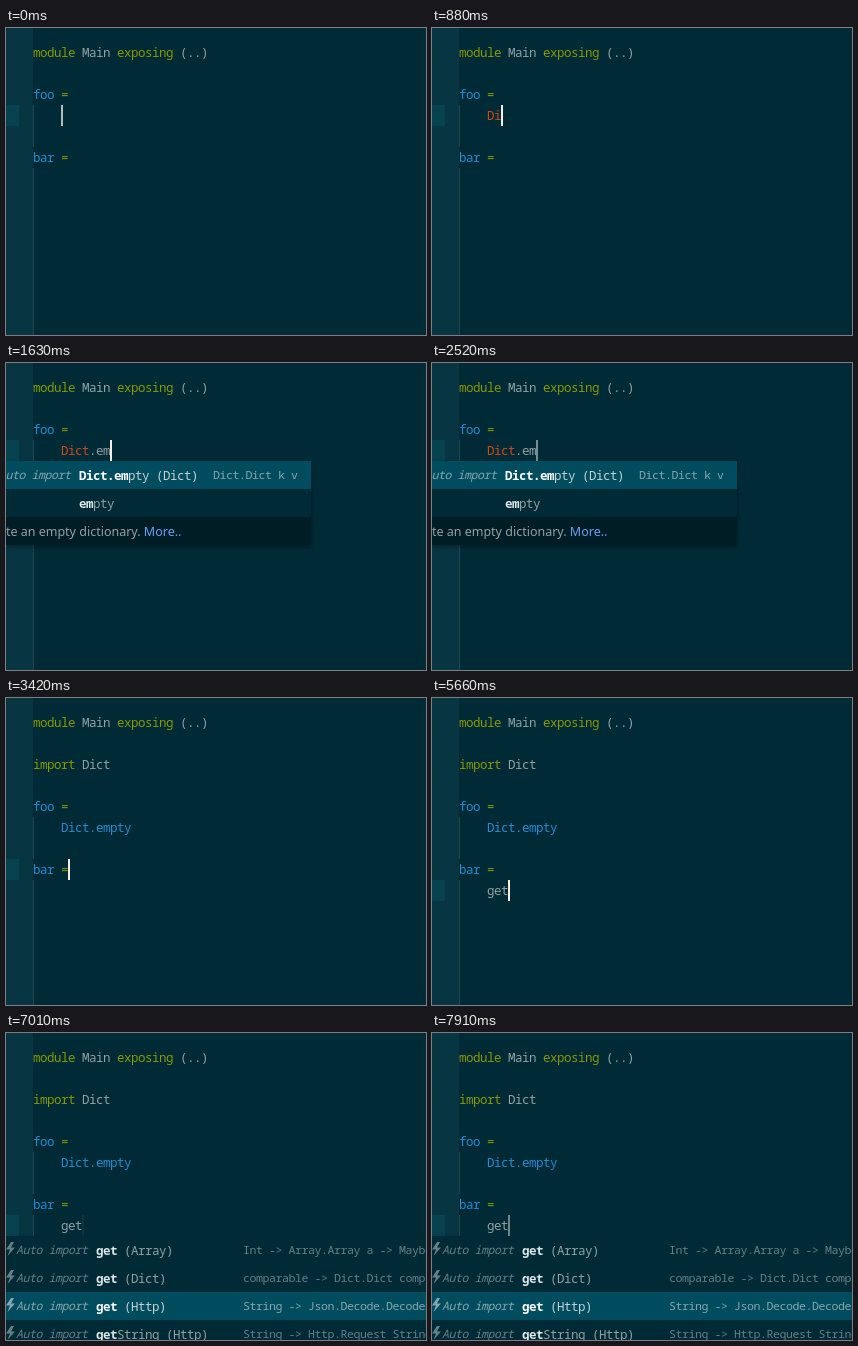
An HTML page that plays this animation: 420 by 307 pixels, repeating every 8000 ms.

```html
<!DOCTYPE html>
<html lang="en">
<head>
<meta charset="utf-8">
<title>Auto import completion</title>
<style>
  html, body { margin: 0; width: 100%; height: 100%; overflow: hidden; background: #002b36; }
  svg { display: block; width: 100%; height: 100%; }
  text { white-space: pre; font: 12.5px "Noto Sans Mono", monospace; letter-spacing: -.5px; fill: #93a1a1; }
  .key { fill: #859900; }
  .name { fill: #268bd2; }
  .type { fill: #cb4b16; }
  .hit { font-weight: 700; fill: #dce6e6; }
  .small { font-size: 11.6px; letter-spacing: -.46px; fill: #667f86; }
  .hint { font-style: italic; }
  .on { fill: #c3d2d4; }
  .on.small { fill: #86a5ac; }
  .on .hit { fill: #fff; }
  .doc { font: 12.5px "Noto Sans", sans-serif; letter-spacing: 0; }
  .link { fill: #6c9ef8; }
  .menu { filter: drop-shadow(0 2px 2px rgba(0, 0, 0, .35)); }
</style>
</head>
<body>
<svg viewBox="0 0 420 307" preserveAspectRatio="none">
  <g id="code"></g>
  <rect id="caret" width="2" height="21" fill="#f4f0e4"/>
  <g id="popup" class="menu"></g>
</svg>
<script>
const LOOP = 8000, LEFT = 27, CHAR = 7, LINE = 21, TOP = 14, ROW = 28;
const $ = id => document.getElementById(id);

const menus = {
  dict: {
    x: 74, y: 98, width: 440, detail: 237, hit: 5,
    items: [
      ['Dict.Dict (Dict)', 'Dict'],
      ['Dict.diff (Dict)', 'Dict.Dict comparable v -> Dict.Dict'],
      ['Dict.empty (Dict)', 'Dict.Dict k v'],
      ['Dict.filter (Dict)', '(comparable -> v -> Bool) -> Dict.Dict'],
      ['Dict.foldl (Dict)', '(comparable -> v -> b -> b) -> b'],
      ['Dict.foldr (Dict)', '(comparable -> v -> b -> b) -> b'],
      ['Dict.fromList (Dict)', 'List ( comparable, v ) -> Dict.Dict'],
      ['Dict.get (Dict)', 'comparable -> Dict.Dict comparable v']
    ]
  },
  empty: {
    x: 73, y: 98, width: 305, detail: 207, hit: 7,
    items: [['Dict.empty (Dict)', 'Dict.Dict k v'], ['empty', '', 2]],
    doc: 'Create an empty dictionary. '
  },
  get: {
    x: 90, y: 203, width: 440, detail: 237, hit: 3,
    items: [
      ['get (Array)', 'Int -> Array.Array a -> Maybe a'],
      ['get (Dict)', 'comparable -> Dict.Dict comparable v'],
      ['get (Http)', 'String -> Json.Decode.Decoder a'],
      ['getString (Http)', 'String -> Http.Request String']
    ]
  }
};

// Each step changes only the fields it names.
const steps = [
  { at: 0, foo: '', bar: null, imported: false, known: false, row: 3, col: 4, menu: null, pick: 0, blink: -200, solid: 0 },
  { at: 600, foo: 'D', col: 5, blink: null },
  { at: 750, foo: 'Di', col: 6 },
  { at: 890, foo: 'Dic', col: 7 },
  { at: 1030, foo: 'Dict', col: 8 },
  { at: 1180, foo: 'Dict.', col: 9 },
  { at: 1330, menu: 'dict' },
  { at: 1480, foo: 'Dict.e', col: 10 },
  { at: 1630, foo: 'Dict.em', col: 11, menu: 'empty', blink: 1785 },
  { at: 2670, foo: 'Dict.empty', col: 14, menu: null, blink: null },
  { at: 2820, imported: true, row: 5 },
  { at: 3120, known: true },
  { at: 3270, row: 7, col: 5 },
  { at: 3870, bar: '', row: 8, col: 0 },
  { at: 4160, col: 4, blink: 4545 },
  { at: 5360, bar: 'g', col: 5, blink: null },
  { at: 5510, bar: 'ge', col: 6 },
  { at: 5660, bar: 'get', col: 7 },
  { at: 5810, menu: 'get', blink: 5650, solid: 6050 },
  { at: 6860, pick: 1 },
  { at: 7010, pick: 2 }
];
steps.forEach((s, i) => { steps[i] = { ...steps[i - 1], ...s }; });

const escape = s => s.replace(/&/g, '&amp;').replace(/</g, '&lt;').replace(/>/g, '&gt;');
const span = (s, cls = '') => `<tspan class="${cls}">${escape(s)}</tspan>`;
const text = (x, y, body, cls = '') => `<text x="${x}" y="${y}" class="${cls}">${body}</text>`;
const rect = (x, y, w, h, fill) => `<rect x="${x}" y="${y}" width="${w}" height="${h}" fill="${fill}"/>`;
const lineTop = row => TOP + row * LINE;

function fooBody(s) {
  if (s.known) return span(s.foo, 'name');
  const [head, tail] = s.foo.split('.');
  const dot = tail === undefined ? '' : span('.', tail ? '' : 'key');
  return span(head, 'type') + dot + span(tail || '');
}

function drawCode(s) {
  const foo = s.imported ? 4 : 2, bar = foo + 3;
  const write = (row, body, col = 0) => text(LEFT + col * CHAR, lineTop(row) + 14.5, body);
  const guide = (from, to) => rect(LEFT, from, 1, to - from, '#1d4751');
  return rect(0, 0, LEFT, 307, '#073642') +
    rect(0, lineTop(s.row), 13, LINE, '#06424f') +
    guide(lineTop(foo + 1), lineTop(bar)) + guide(lineTop(bar + 1), 307) +
    write(0, span('module ', 'key') + span('Main ') + span('exposing ', 'key') + span('(..)')) +
    (s.imported ? write(2, span('import ', 'key') + span('Dict')) : '') +
    write(foo, span('foo ', 'name') + span('=', 'key')) +
    write(foo + 1, fooBody(s), 4) +
    write(bar, span('bar ', 'name') + span('=', 'key')) +
    (s.bar ? write(bar + 1, span(s.bar), 4) : '');
}

function drawItem(m, [label, detail, hit = m.hit], i, pick) {
  const y = m.y + i * ROW, base = y + 18.5, on = i === pick ? ' on' : '';
  const bolt = `<path transform="translate(${m.x - 90} ${y + 6})" d="M5 0L0 7.5H4L1.5 14L9 5.5H5L8 0Z" fill="${on ? '#86a5ac' : '#667f86'}"/>`;
  return (on ? rect(0, y, m.width, ROW, '#004c5f') : '') +
    (detail ? bolt + text(m.x - 80, base - .5, 'Auto import', 'small hint' + on) : '') +
    text(m.x, base, span(label.slice(0, hit), 'hit') + span(label.slice(hit)), on) +
    text(m.detail, base - .5, escape(detail), 'small' + on);
}

function drawMenu(s) {
  const m = menus[s.menu];
  if (!m) return '';
  const height = m.items.length * ROW, end = m.y + height;
  return rect(0, m.y, m.width, height, '#002a35') +
    m.items.map((item, i) => drawItem(m, item, i, s.pick)).join('') +
    (m.doc ? rect(0, end, m.width, ROW, '#001d25') +
      text(-27, end + 18.5, span(m.doc) + span('More..', 'link'), 'doc') : '');
}

// One second per cycle: hold, fade out, rest, fade in.
function caretAlpha(s, t) {
  if (s.blink === null || t < s.blink || t < s.solid) return 1;
  const u = (t - s.blink) % 1000, half = u < 500 ? u : 1000 - u;
  const p = Math.min(1, Math.max(0, (half - 100) / 300));
  return 1 - p * p * (3 - 2 * p);
}

let shown = null;
function render(t) {
  const s = steps.findLast(step => step.at <= t);
  if (s !== shown) {
    shown = s;
    $('code').innerHTML = drawCode(s);
    $('popup').innerHTML = drawMenu(s);
    $('caret').setAttribute('x', LEFT + s.col * CHAR);
    $('caret').setAttribute('y', lineTop(s.row));
  }
  const tick = Math.floor((t + 20) / 149.2) * 149.2;
  $('caret').setAttribute('opacity', caretAlpha(s, tick).toFixed(3));
}

const start = performance.now();
function frame() {
  render((performance.now() - start) % LOOP);
  requestAnimationFrame(frame);
}
frame();
</script>
</body>
</html>
```
